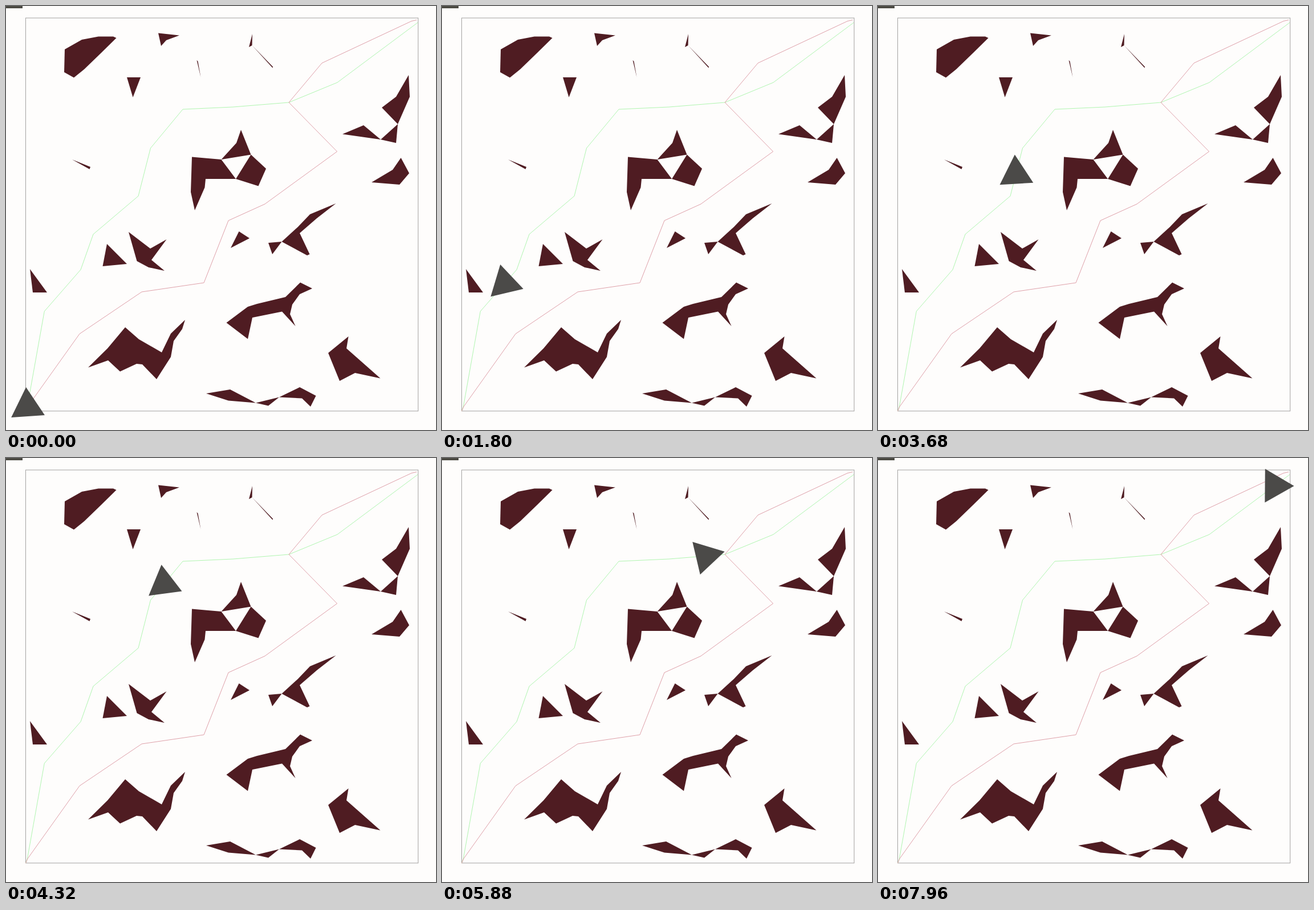
These frames come from a looping animation (754x743 px, 8 s). An HTML page:

```html
<!DOCTYPE html>
<html lang="en">
<head>
<meta charset="utf-8">
<title>Path planning</title>
<style>
  html, body { margin: 0; width: 100%; height: 100%; overflow: hidden; background: #fefdfc; }
  svg { display: block; width: 754px; height: 743px; }
  .line { fill: none; stroke-width: 1; }
</style>
</head>
<body>
<svg viewBox="0 0 754 743">
  <rect width="754" height="743" fill="#fefdfc"/>
  <rect width="29" height="4" fill="#4b4a43"/>
  <rect class="line" x="34.5" y="21" width="688.2" height="688.8" stroke="#a3a2a1"/>

  <g fill="#4f1c22">
    <polygon points="103,76 133,59 162,53.5 188,53.5 193.5,56 165,84 137,111 119,125.5 102,116"/>
    <polygon points="267,47.5 304,51.5 281,60 272,70"/>
    <polygon points="212,125 236,125 222.5,160"/>
    <polygon points="334.5,95 336.5,97 341.5,125"/>
    <polygon points="432,49 431.5,69 426,72"/>
    <polygon points="431.5,69 468,106.5 467.5,108.5"/>
    <polygon points="116,269 148,282 146.5,286"/>
    <polygon points="706,121 708,159 687,207 659,178 684,159"/>
    <polygon points="687,207 684,240 657,234"/>
    <polygon points="657,234 590,224.5 627,209"/>
    <polygon points="692.5,266 707,293 690,313 641,309 678,287"/>
    <polygon points="412,217 429.5,260.5 377.5,269 404,240"/>
    <polygon points="429.5,260.5 456,285 442.5,315.5 403,303"/>
    <polygon points="326,264.5 377.5,269 403,303 350,303 348.5,318 331,358 324,326"/>
    <polygon points="177,417 212,452 169.5,456"/>
    <polygon points="215,396 253,425 281.5,409 255,445 278,464 250,458 229.5,447"/>
    <polygon points="42,461 72,502 47,502"/>
    <polygon points="408.5,395 427,407 394,424"/>
    <polygon points="578.5,346 545,372 515,398 532.5,435 528,437 483.5,413 512,387 533,365"/>
    <polygon points="483.5,413 467,435 460,415"/>
    <polygon points="516,484.5 537,495 515,505 502,523 498,540 507.5,561 484,535.5 432,546 424,583.5 386.5,555 424,527 440,522 490,510"/>
    <polygon points="209,563 233,584 273,607 289,574 314,550 309,566 294,587 289,615 264,654 239,628 229,627 200,640.5 179,621 144,633.5 178,600"/>
    <polygon points="600.5,579 597,600 656.5,652.5 612,643 585,657 565,608"/>
    <polygon points="351,679 393,672 438,695.5 390,691.5"/>
    <polygon points="438,695.5 479,685.5 460,700.5"/>
    <polygon points="479,685.5 515,668 543.5,683 534,702 519,687.5"/>
  </g>

  <polyline class="line" id="route" stroke="#b0f5b0"/>
  <polyline class="line" stroke="#dea0a9"
    points="34.5,710 38,702 129,574.5 238,501 347,485 390,376 454,347 580.5,255 496,169 554,100 711,26.5 720,24.5"/>
  <polygon id="robot" fill="#4b4a48" points="34,0 -17,29.45 -17,-29.45"/>
</svg>

<script>
const LOOP = 8000, STEP = 40;
const SPEED = 0.1326;       // path cost per millisecond
const TURN_COST = 0.07;     // path cost per degree of rotation

// Waypoints: x, y, heading in degrees
const poses = [
  [37.4, 702, 26.1], [67.3, 535, 49.6], [131, 462, 0.5], [153, 400, -20],
  [232, 333, -98], [253.5, 249, -88], [310, 181, -111], [398, 177, -124],
  [496, 169, -138], [581, 134, -218], [722, 29, -244.5]
];

const cost = (a, b) =>
  Math.hypot(b[0] - a[0], b[1] - a[1]) + TURN_COST * Math.abs(b[2] - a[2]);

function poseAt(time) {
  let left = time * SPEED;
  for (let i = 1; i < poses.length; i++) {
    const [from, to] = [poses[i - 1], poses[i]];
    const length = cost(from, to);
    if (left <= length) return from.map((v, k) => v + (to[k] - v) * left / length);
    left -= length;
  }
  return poses[poses.length - 1];
}

const robot = document.getElementById('robot');
document.getElementById('route').setAttribute('points',
  '34.5,710 ' + poses.map(([x, y]) => `${x},${y}`).join(' '));

function draw() {
  const time = Math.floor(performance.now() % LOOP / STEP) * STEP;
  const [x, y, angle] = poseAt(time);
  robot.setAttribute('transform', `translate(${x} ${y}) rotate(${angle})`);
  requestAnimationFrame(draw);
}
draw();
</script>
</body>
</html>
```
